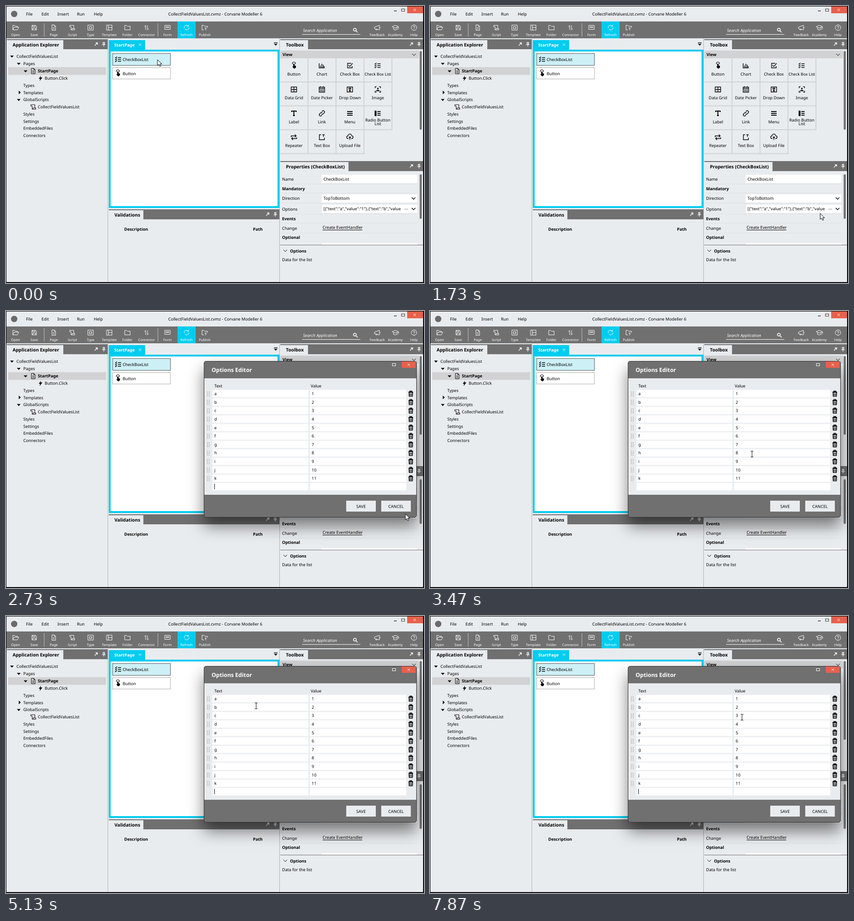
An HTML page with a canvas for the animation above (8000 ms loop, 919 by 609 pixels).

```html
<!DOCTYPE html>
<html lang="en">
<head>
<meta charset="utf-8">
<title>Options editor</title>
<style>
  html, body { margin: 0; width: 100%; height: 100%; overflow: hidden; }
  canvas { display: block; }
</style>
</head>
<body>
<canvas id="stage" width="919" height="609"></canvas>
<script>
const ctx = document.getElementById('stage').getContext('2d');
ctx.textRendering = 'geometricPrecision';

const PALE = '#e9ecef', GRAY = '#707070', CYAN = '#00ccf0', LINE = '#d0d2d4', RED = '#e8604c';
const BLACK = '#000', WHITE = '#fff';
const LOOP = 8000, STEP = 200 / 3, DIALOG_AT = 2730;
const ROWS = 11, ROW_TOP = 173.5, ROW_PITCH = 18.6, ROW_HEIGHT = 16.4;

// Pointer positions: time, x, y
const POINTER = [
  [540, 333, 118], [800, 430, 215], [1130, 657, 410], [1400, 819, 452],
  [1800, 866, 457], [2130, 878, 446], [3135, 878, 446], [3500, 690, 300],
  [3930, 478, 189], [4135, 478, 189], [4330, 661, 190], [4470, 693, 188],
  [4530, 691, 189], [4735, 691, 189], [5330, 480, 201], [5465, 480, 201],
  [6000, 691, 201], [6335, 691, 201], [6730, 480, 222], [7005, 480, 222], [7400, 686, 222]
];

const ICONS = {
  open: 'M-6 5V-5H-2L0-3H4V-1M-6 5L-3-1H7L4 5Z',
  save: 'M-5-5H3L5-3V5H-5ZM-3-5V-2H2V-5M-3 5V1H3V5',
  page: 'M-4-6H1L4-3V6H-4ZM1-6V-3H4M-2 0H2M-2 3H2',
  script: 'M-6-5H3V2M-6-5V-2H-3V5H5V2H-1V5',
  type: 'M-6-5.500H6V5.500H-6ZM-2.500-2H2.500V2.500H-2.500Z',
  template: 'M-6-5.500H6V5.500H-6ZM-2-5.500V5.500M-2 0H6',
  folder: 'M-6 5V-5H-2L0-3H6V5Z',
  connector: 'M-2 5V-5L-4.500-2M2-5V5L4.500 2',
  form: 'M-6-5H6V4H-6ZM-4-2H4M-4 0H4',
  refresh: 'M-5 1A5 5 0 0 1 4-3M5-1A5 5 0 0 1-4 3M4-6V-3H1',
  publish: 'M-2 5H-6V-5H-2L0-3H6V0M2 6V0M0 2L2 0 4 2',
  feedback: 'M-6-1L5-5V5L-6 2ZM-3 3V5H0V4M7-1V1',
  academy: 'M-7-2L0-5 7-2 0 1ZM-4 0V4Q0 6 4 4V0M7-2V3',
  help: 'M-6 0A6 6 0 1 0 6 0A6 6 0 1 0-6 0M-2-1.500A2 2 0 1 1 0 .8V1.500M0 3V4',
  hand: 'M-1 1V-3A1 1 0 0 1 1-3V0L4 1V4L2 6H0L-3 2-1 3Z',
  tap: 'M-3-1A3.400 3.400 0 1 1 3-1',
  chart: 'M-6-5V5H6M-3 4V0M0 4V-4M3 4V-2M5 4V1',
  check: 'M3-5H-5V5H5V1M-3-1L0 2 6-5',
  checkList: 'M-7-4L-6-3-3-6M-7 0L-6 1-3-2M-7 4L-6 5-3 2M-1-4H6M-1 0H6M-1 4H6',
  grid: 'M-6-5.500H6V5.500H-6ZM0-5.500V5.500M-6 0H6',
  date: 'M-6-5H6V6H-6ZM-6-2H6M-3-7V-4M3-7V-4M-4 1H-2M-1 1H1M2 1H4M-4 3.500H-2M-1 3.500H1M2 3.500H4',
  dropDown: 'M-6-5.500H6V5.500H-6ZM-3-3H3M-3-1H3M0 0V3M-2 2L0 4 2 2',
  image: 'M-6-3V-6H-3M3-6H6V-3M6 3V6H3M-3 6H-6V3M-3 3Q0 0 3 3ZM-1-2A1 1 0 1 0 1-2A1 1 0 1 0-1-2',
  label: 'M-5-3V-5H5V-3M0-5V5M-2 5H2',
  link: 'M-1 1A2.500 2.500 0 0 0 2 2L5-1A2.600 2.600 0 0 0 1-5L0-4M1-1A2.500 2.500 0 0 0-2-2L-5 1A2.600 2.600 0 0 0-1 5L0 4',
  menu: 'M-6-4H6M-6 0H6M-6 4H6',
  radioList: 'M-6-5H-4V-3H-6ZM-6-1H-4V1H-6ZM-6 3H-4V5H-6ZM-1-4H6M-1 0H6M-1 4H6',
  repeater: 'M-6 0V-3H5M2-6L5-3 2 0M6 0V3H-5M-2 0L-5 3-2 6',
  textBox: 'M-2-5.500H-5.500V5.500H5.500V1M1-5.500H6M3.500-5.500V-1',
  upload: 'M-3 3H-4A3 3 0 0 1-4-3A4 4 0 0 1 4-3A3 3 0 0 1 4 3H3M0 6V-1M-2 1L0-1 2 1',
  down: 'M-4-2L0 2 4-2',
  cross: 'M-2.500-2.500L2.500 2.500M2.500-2.500L-2.500 2.500',
  detach: 'M-3 3L3-3M-1-3H3V1',
  pin: 'M-2.500-4H2.500M-1.500-4V1M1.500-4V1M1-4V1M-4 1H4M0 1V5',
  search: 'M-4-1A3 3 0 1 0 2-1A3 3 0 1 0-4-1M1 1L5 5',
  trash: 'M-5-4H5M-2-4V-6H2V-4M-4-3L-3.500 5.500H3.500L4-3ZM-1.500-1V4M1.500-1V4',
  bolt: 'M1-6L-4 1H-1L-2 6 4-2H0Z',
  openNode: 'M-4-2H4L0 2.500Z',
  closedNode: 'M-2-4V4L2.500 0Z',
  arrow: 'M0 0V13L3 10.400 5.200 15 7.400 14 5.200 9.500H9.500Z',
  beam: 'M-3-6.500H-1L0-6 1-6.500H3M0-6V6M-3 6.500H-1L0 6 1 6.500H3'
};
for (const name in ICONS) ICONS[name] = new Path2D(ICONS[name]);

function box(x, y, w, h, color) {
  ctx.fillStyle = color;
  ctx.fillRect(x, y, w, h);
}

function outline(x, y, w, h, color) {
  ctx.strokeStyle = color;
  ctx.lineWidth = 1;
  ctx.strokeRect(x, y, w, h);
}

function round(x, y, w, h, r, color) {
  ctx.fillStyle = color;
  ctx.beginPath();
  ctx.roundRect(x, y, w, h, r);
  ctx.fill();
}

// y is the middle of the capitals
function text(s, x, y, { size = 9.1, style = '', color = BLACK, align = 'left' } = {}) {
  ctx.font = `${style} ${size}px "Noto Sans", sans-serif`;
  ctx.fillStyle = color;
  ctx.textAlign = align;
  ctx.fillText(s, x, y + size * 0.36);
}

const bold = (s, x, y, size = 9.1, color = BLACK) => text(s, x, y, { size, style: 'bold', color });

function icon(name, x, y, { stroke = BLACK, fill, width = 1 } = {}) {
  ctx.save();
  ctx.translate(x, y);
  ctx.lineWidth = width;
  if (fill) { ctx.fillStyle = fill; ctx.fill(ICONS[name]); }
  if (stroke) { ctx.strokeStyle = stroke; ctx.stroke(ICONS[name]); }
  ctx.restore();
}

function hand(x, y) {
  icon('hand', x, y, { fill: BLACK });
  icon('tap', x, y - 2, { width: 1.2 });
}

function panel(title, x, y, w, h, tabWidth) {
  box(x, y, w, h, PALE);
  box(x + tabWidth, y, w - tabWidth, 22, GRAY);
  box(x, y, tabWidth, 2, GRAY);
  bold(title, x + 12.5, y + 12, 10.1);
  icon('detach', x + w - 26, y + 11, { stroke: WHITE, width: 1.4 });
  icon('pin', x + w - 9, y + 11, { stroke: WHITE, width: 1.2 });
}

function windowBars() {
  box(0, 0, 919, 609, PALE);
  ctx.fillStyle = '#6a6a6a';
  ctx.beginPath();
  ctx.arc(18, 17.5, 7, 0, 7);
  ctx.fill();
  [['File', 44], ['Edit', 78], ['Insert', 113], ['Run', 156], ['Help', 193]]
    .forEach(([s, x]) => text(s, x, 17.5));
  text('CollectFieldValuesList.cvmz - Corvane Modeller 6', 460, 17.5, { align: 'center' });
  box(853, 10, 6, 1.5, '#333');
  outline(869.5, 6.5, 7, 5, '#333');
  box(882, 1, 35, 15, RED);
  icon('cross', 898.5, 8.5, { stroke: WHITE });

  box(1, 34, 916, 37, GRAY);
  box(377, 34, 40, 37, CYAN);
  box(83.5, 38, 1, 29, '#c4c4c4');
  box(333.500, 38, 1, 29, '#c4c4c4');
  [['Open', 21], ['Save', 62], ['Page', 105], ['Script', 146], ['Type', 186], ['Template', 227],
    ['Folder', 267], ['Connector', 309], ['Form', 355], ['Refresh', 397], ['Publish', 437],
    ['Feedback', 816], ['Academy', 856], ['Help', 897]].forEach(([s, x]) => {
    icon(s.toLowerCase(), x, 47.5, { stroke: WHITE });
    text(s, x, 63.5, { size: 7.5, color: WHITE, align: 'center' });
  });
  text('Search Application', 653, 53.5, { style: 'italic', color: WHITE });
  box(651, 62, 128, 1, WHITE);
  icon('search', 768, 53, { stroke: WHITE, width: 1.6 });
}

function explorer() {
  panel('Application Explorer', 2, 73, 222, 534, 124);
  box(5, 134.5, 215, 17, '#d1d2d4');
  [['CollectFieldValuesList', 23, 111], ['Pages', 38, 127], ['Button.Click', 85, 159], ['Types', 38, 175],
    ['Templates', 38, 190.5], ['GlobalScripts', 38, 206], ['CollectFieldValuesList', 70, 222],
    ['Styles', 38, 238], ['Settings', 38, 254], ['EmbeddedFiles', 38, 269], ['Connectors', 38, 285]]
    .forEach(([s, x, y]) => text(s, x, y));
  bold('StartPage', 70, 143);
  [[13, 111], [28, 127], [43, 143.500], [28, 206.500]]
    .forEach(([x, y]) => icon('openNode', x, y, { fill: BLACK, stroke: null }));
  icon('closedNode', 30, 190, { fill: BLACK, stroke: null });
  icon('page', 60, 143);
  icon('bolt', 76, 159, { fill: BLACK, stroke: null });
  icon('script', 60.5, 222);
}

function designer() {
  box(226, 75, 80, 22, CYAN);
  bold('StartPage', 238, 86, 9.1, WHITE);
  icon('cross', 294.5, 85, { stroke: WHITE });
  box(589, 80, 8, 1.5, '#222');
  icon('openNode', 593, 85, { fill: '#222', stroke: null });
  box(226, 96, 375, 348, CYAN);
  box(230, 100, 367, 340, WHITE);
  box(234, 104, 128, 27, '#cdf0f6');
  outline(234.5, 104.5, 127, 26, '#555');
  outline(234.5, 135.5, 127, 25, '#ababab');
  icon('checkList', 247, 117.5, { width: 1.4 });
  text('CheckBoxList', 256.5, 118);
  hand(246, 148);
  text('Button', 256.5, 149);

  panel('Validations', 226, 447, 375, 160, 76);
  bold('Description', 260, 491);
  bold('Path', 543, 491);
}

function toolbox() {
  panel('Toolbox', 603, 73, 314, 266, 61);
  box(603, 98, 305, 17, '#d1d2d4');
  bold('View', 608, 107);
  icon('down', 897, 107);
  [['Button'], ['Chart', 'chart'], ['Check Box', 'check'], ['Check Box List', 'checkList'],
    ['Data Grid', 'grid'], ['Date Picker', 'date'], ['Drop Down', 'dropDown'], ['Image', 'image'],
    ['Label', 'label'], ['Link', 'link'], ['Menu', 'menu'], ['Radio Button', 'radioList'],
    ['Repeater', 'repeater'], ['Text Box', 'textBox'], ['Upload File', 'upload']].forEach(([s, name], i) => {
    const x = 602.5 + i % 4 * 61.5, y = 115 + Math.floor(i / 4) * 52.5;
    const mid = x + 30.5, size = s === 'Check Box List' ? 8.7 : 9;
    box(x + 60.5, y, 2, 52, LINE);
    box(x, y + 51, 62.5, 2, LINE);
    if (name) icon(name, mid, y + 16, { width: /label|menu|radioList/.test(name) ? 2 : 1.4 });
    else hand(mid, y + 16);
    const twoLines = s === 'Radio Button';
    text(s, mid, y + (twoLines ? 30.5 : 34.5), { size, align: 'center' });
    if (twoLines) text('List', mid, y + 39, { size, align: 'center' });
  });
  round(909.5, 99, 4.5, 173, 2, GRAY);
}

function properties(t) {
  panel('Properties (CheckBoxList)', 603, 341, 314, 266, 150);
  [391, 411, 433, 457, 477, 499].forEach(y => box(604, y, 300, 1, '#dfe2e5'));
  [[371, 18], [414, 18], [437, 18], [521, 4]].forEach(([y, h]) => box(694, y, 210, h, WHITE));
  [['Name', 380.5], ['Direction', 422.500], ['Options', 446.500], ['Change', 488.500], ['Data for the list', 558]]
    .forEach(([s, y]) => text(s, 607, y));
  [['Mandatory', 402], ['Events', 468], ['Optional', 509]].forEach(([s, y]) => bold(s, 607, y));
  text('CheckBoxList', 698, 380.5);
  text('TopToBottom', 698, 423);
  text('[{"text":"a","value":"1"},{"text":"b","value', 698, 446);
  if (t >= 2330 && t < 2470) box(872, 437, 16, 20, LINE);
  for (let i = 0; i < 3; i++) box(876.5 + i * 3, 446, 1.3, 1.3, '#333');
  icon('down', 896, 423, { width: 1.4 });
  icon('down', 896, 446, { width: 1.4 });
  text('Create EventHandler', 696, 487);
  box(696, 492, 87.5, 1, BLACK);
  round(909.5, 370, 4.5, 98, 2, GRAY);
  box(603, 525, 314, 1, GRAY);
  icon('down', 614, 538);
  bold('Options', 624.5, 539);
}

function dialog(t) {
  ctx.save();
  ctx.shadowColor = 'rgba(0,0,0,.5)';
  ctx.shadowBlur = 34;
  ctx.shadowOffsetY = 19;
  round(435, 110, 468, 344, 5, '#2c2c2c');
  ctx.restore();
  round(436, 111, 466, 342, 4, GRAY);
  box(436, 148, 466, 256, PALE);
  bold('Options Editor', 452, 130, 12.35, WHITE);
  outline(849.5, 115.5, 7, 5, WHITE);
  box(870, 111, 31, 14, RED);
  icon('cross', 885.5, 118, { stroke: WHITE });
  text('Text', 458, 165);
  text('Value', 670, 165);
  for (let i = 0; i <= ROWS; i++) {
    const y = ROW_TOP + i * ROW_PITCH, mid = y + 8.5;
    box(454, y, 211, ROW_HEIGHT, WHITE);
    box(668, y, 212, ROW_HEIGHT, WHITE);
    if (i === ROWS) break;
    text(String.fromCharCode(97 + i), 458, mid);
    text(String(i + 1), 672, mid);
    for (let d = 0; d < 8; d++) box(442 + d % 2 * 4, mid - 5 + (d >> 1) * 3, 1.5, 1.5, '#999');
    icon('trash', 890, mid, { width: 1.5 });
  }
  if (Math.floor((t - 2790) / 508) % 2 === 0 || t < 2790) box(458, 380, 1, 12, BLACK);
  box(748, 417, 65, 24, PALE);
  box(825, 417, 65, 24, PALE);
  text('SAVE', 780.5, 429.5, { align: 'center' });
  text('CANCEL', 857.5, 429.5, { align: 'center' });
}

function pointerAt(t) {
  const next = POINTER.findIndex(key => key[0] > t);
  if (next === 0) return POINTER[0].slice(1);
  if (next < 0) return POINTER.at(-1).slice(1);
  const [t0, x0, y0] = POINTER[next - 1], [t1, x1, y1] = POINTER[next];
  const k = (t - t0) / (t1 - t0);
  return [x0 + (x1 - x0) * k, y0 + (y1 - y0) * k];
}

function overInput(x, y, dialogOpen) {
  if (!dialogOpen) return x > 694 && x < 870 && y > 437 && y < 455;
  const row = (y - ROW_TOP) / ROW_PITCH;
  const inColumn = (x > 454 && x < 665) || (x > 668 && x < 880);
  return inColumn && row >= 0 && row <= ROWS + 1 && row % 1 * ROW_PITCH < ROW_HEIGHT;
}

function pointer(t) {
  // The pointer moves at 15 steps per second
  const [x, y] = pointerAt(Math.floor((t + 4) / STEP) * STEP - 2);
  if (overInput(x, y, t >= DIALOG_AT)) icon('beam', Math.round(x), Math.round(y) + 0.5);
  else icon('arrow', x, y, { fill: WHITE });
}

function border() {
  box(0, 0, 919, 1, BLACK);
  box(0, 0, 1, 609, BLACK);
  box(917, 0, 2, 609, BLACK);
  box(0, 607, 919, 2, BLACK);
}

function draw() {
  const t = performance.now() % LOOP;
  windowBars();
  explorer();
  designer();
  toolbox();
  properties(t);
  [[223.5, 72, 1, 535], [601, 72, 1, 535]].forEach(([x, y, w, h]) => box(x, y, w, h, '#aeb0b2'));
  if (t >= DIALOG_AT) dialog(t);
  border();
  pointer(t);
  requestAnimationFrame(draw);
}
requestAnimationFrame(draw);
</script>
</body>
</html>
```
